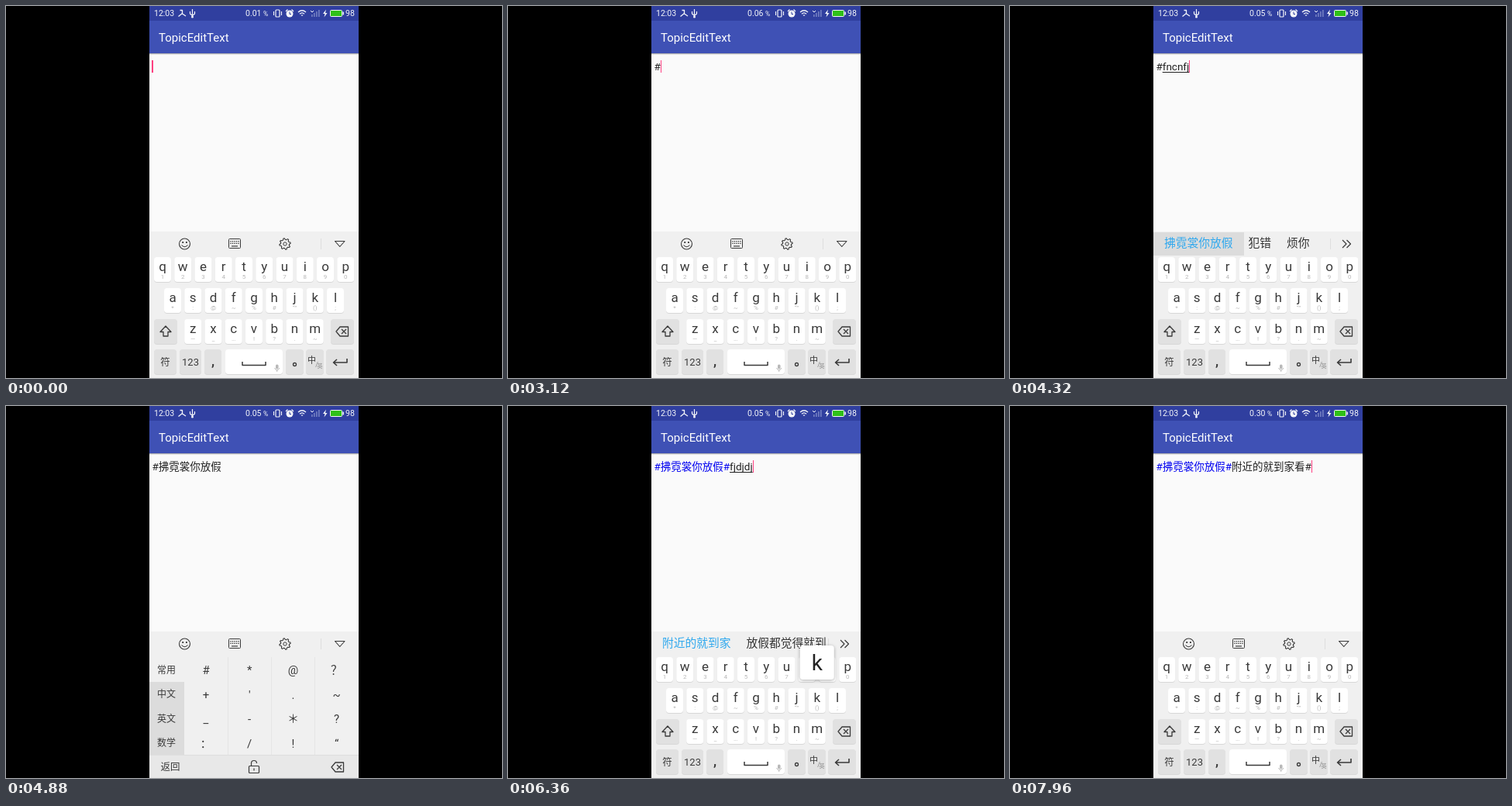
An HTML page that plays this animation: 640x480 px, repeating every 8 s.

```html
<!DOCTYPE html>
<html lang="zh-CN">
<head>
<meta charset="utf-8">
<title>TopicEditText</title>
<style>
html, body { margin: 0; width: 100%; height: 100%; overflow: hidden; background: #000; }
#stage { position: absolute; left: 0; top: 0; width: 640px; height: 480px; overflow: hidden; }
#stage, svg text { font-family: Roboto, "Noto Sans CJK SC", "Noto Sans CJK", sans-serif; }
svg { position: absolute; left: 0; top: 0; }
#line { position: absolute; left: 188.4px; top: 68px; height: 20px; font-size: 13.5px; line-height: 20px; color: #212121; white-space: pre; }
#topic { color: #0000f0; }
#comp { text-decoration: underline 1px; text-underline-offset: 2px; text-decoration-skip-ink: none; }
#caret { position: absolute; right: -1.2px; top: 2px; width: 1.3px; height: 16px; background: #ff4081; }
#cands { position: absolute; left: 185px; top: 292px; width: 228px; height: 30px; padding-left: 14px; box-sizing: border-box;
  display: flex; gap: 20px; overflow: hidden; font-size: 14.75px; line-height: 29px; color: #333; white-space: nowrap; }
#cands span { flex: none; }
#cands span:first-child { color: #2fa8ee; }
#cands.down span:first-child { background: #dcdcdc; box-shadow: 0 0 0 14px #dcdcdc; }
</style>
</head>
<body>
<div id="stage">
  <svg id="scene" width="640" height="480" viewBox="0 0 640 480"></svg>
  <div id="line"><span id="topic"></span><span id="plain"></span><span id="comp"></span><i id="caret"></i></div>
  <div id="cands"></div>
  <svg id="over" width="640" height="480" viewBox="0 0 640 480"></svg>
</div>
<script>
const $ = id => document.getElementById(id);
const INK = '#3a3a3a', BOARD = '#f0f0f0', FUNC = '#e1e1e1', PRESSED = '#cacaca', RULE = '#dedede', FAINT = '#b8b8b8';

const rect = (x, y, w, h, fill, r = 0, extra = '') =>
  `<rect x="${x}" y="${y}" width="${w}" height="${h}" rx="${r}" fill="${fill}" ${extra}/>`;
const label = (s, x, y, size, fill = INK, anchor = 'middle', extra = '') =>
  `<text x="${x}" y="${y}" font-size="${size}" fill="${fill}" text-anchor="${anchor}" ${extra}>${s}</text>`;
const stroke = (d, color = INK, w = 1.1, fill = 'none') =>
  `<path d="${d}" stroke="${color}" stroke-width="${w}" fill="${fill}" stroke-linejoin="round"/>`;
const key = (x, y, w, fill, id = '') =>
  rect(x, y + 1, w, 32, '#d8d8d8', 4) + rect(x, y, w, 32, fill, 4, id && `id="${id}"`);
const eraser = (x, y) =>
  stroke(`M${x - 8} ${y}l5 -6h10.5v12h-10.5z M${x - 1} ${y - 3}l6 6m0 -6l-6 6`, INK, 1.3);

function gear(cx, cy) {
  let d = '';
  for (let i = 0; i < 32; i++) {
    const a = (i - 1.5) * Math.PI / 16, r = i % 4 < 2 ? 7.2 : 5.5;
    d += `${i ? 'L' : 'M'}${(cx + r * Math.cos(a)).toFixed(2)} ${(cy + r * Math.sin(a)).toFixed(2)}`;
  }
  return stroke(d + 'z') + `<circle cx="${cx}" cy="${cy}" r="2.2" fill="none" stroke="${INK}"/>`;
}

function statusBar() {
  const W = '#f4f6fa';
  return rect(185, 0, 270, 19, '#303f9f') +
    label('12:03', 191, 13, 10.5, W, 'start') +
    stroke('M224.5 5.5h3v4.5M227.5 9.5l-5 4M227.5 10l4.5 3', W, 1.3) +
    stroke('M240.5 4v11M237.5 7v3l3 2.5 3 -2.5v-3', W, 1.2) +
    `<circle cx="240.5" cy="14" r="1.5" fill="${W}"/>` +
    label('0.01', 309, 13, 10.5, W, 'start', 'id="rate"') + label('%', 332, 13, 8.5, W, 'start') +
    rect(348, 5, 5, 9, 'none', 1, `stroke="${W}" stroke-width="1.2"`) +
    stroke('M345.5 7v5M355.5 7v5', W, 1.1) +
    `<circle cx="366" cy="10" r="4.5" fill="${W}"/>` +
    stroke('M366 7.5v3h2', '#303f9f', 1) + stroke('M361 7l2.5 -2.500M371 7l-2.500 -2.500', W, 1.3) +
    stroke('M377 8q5 -4.500 10 0M379 10.300q3 -2.800 6 0M381 12.400q1 -1 2 0', W, 1.3) +
    stroke('M393 6l2 2 2 -2', W, 1) +
    [0, 1, 2, 3].map(i => rect(394 + i * 3, 11 - i * 2, 1.7, 3 + i * 2, '#6f7cc0')).join('') +
    `<path d="M413 4.500l-4 5.500h2.500l-1 4.500 4 -5.500h-2.500z" fill="${W}"/>` +
    rect(418.5, 5.5, 15, 8, '#2fc018', 1, `stroke="${W}"`) + rect(434.5, 7.5, 1.5, 4, W) +
    label('98', 438, 13, 10.5, W, 'start');
}

function toolbar() {
  let dots = '';
  for (let r = 0; r < 2; r++)
    for (let c = 0; c < 5; c++) dots += rect(289.3 + c * 2.5, 303 + r * 2.7, 1.3, 1.3, INK);
  return `<circle cx="230.5" cy="307" r="7" fill="none" stroke="${INK}" stroke-width="1.1"/>` +
    rect(227.3, 304, 1.8, 2, INK) + rect(232, 304, 1.8, 2, INK) + stroke('M226.5 308.5q4 4.5 8 0') +
    rect(287.5, 300.5, 15, 12, 'none', 1, `stroke="${INK}"`) + dots + rect(291, 309.3, 8, 1.2, INK) +
    gear(360, 307) + rect(406, 300, 1, 14, RULE) + stroke('M424.5 303.5h12.5l-6.25 7z');
}

const ROWS = [
  { keys: 'qwertyuiop', hints: [...'1234567890'], x: 202, y: 324 },
  { keys: 'asdfghjkl', hints: ['*', ':', '@', '~', '%', '#', '“”', '()', ';'], x: 215, y: 364 },
  { keys: 'zxcvbnm', hints: ['—', '_', '…', '!', '?', '.', '~'], x: 241.2, y: 404 }
];
const STEP = 26.25, spot = {};

function letters() {
  let s = '';
  for (const { keys, hints, x, y } of ROWS)
    [...keys].forEach((k, i) => {
      const cx = x + i * STEP;
      spot[k] = [cx, y];
      s += key(cx - 11, y, 22, '#fff') + label(k, cx, y + 18, 17) + label(hints[i], cx, y + 27.5, 8, FAINT);
    });
  return s + key(191, 404, 30, FUNC) + key(419, 404, 30, FUNC) +
    stroke('M206 413l-7 7.5h4v5.5h6v-5.5h4z', INK, 1.3) + eraser(434, 420) +
    key(191, 443, 29, FUNC, 'symKey') + label('符', 205.5, 464, 12.5) +
    key(224, 443, 28, FUNC) + label('123', 238, 464, 13) +
    key(256, 443, 22, FUNC) + label(',', 267, 464, 17, INK, 'middle', 'font-weight="700"') +
    key(283, 443, 74, '#fff') + stroke('M305 459v4.5h30v-4.5', INK, 1.5) +
    rect(348, 462.5, 3.5, 6, FAINT, 1.7) + stroke('M346.5 467q3.2 6 6.5 0M349.7 470v2', FAINT, 1) +
    key(361, 443, 23, FUNC) + `<circle cx="372.5" cy="462.5" r="2" fill="none" stroke="${INK}" stroke-width="1.3"/>` +
    key(387, 443, 23, FUNC) + label('中', 394.5, 461, 11) + label('/', 401, 466, 9, '#888') + label('英', 405, 467, 7, '#888') +
    key(413, 443, 36, FUNC) + stroke('M440 455v5h-17M427 456l-4.5 4 4.5 4', INK, 1.6);
}

function symbols() {
  const cells = ['#*@？', "+'.~", '_-＊?', '：/!“'];
  let s = rect(185, 356, 45, 94, '#dcdcdc') + rect(185, 450, 270, 30, '#e8e8e8') +
    rect(185, 450, 270, 1, RULE) + rect(230, 324, 56, 32, '#dcdcdc', 0, 'id="hashCell"') +
    [286, 342, 398].map(x => rect(x, 324, 1, 126, '#e5e5e5')).join('');
  ['常用', '中文', '英文', '数学'].forEach((name, r) => {
    const y = 340 + r * 31.5;
    s += label(name, 207, y + 4.5, 12);
    [...cells[r]].forEach((c, i) => s += label(c, 258 + i * 56.2, y + 6, 15));
  });
  return s + label('返回', 212, 470, 12.5) +
    rect(313.5, 464.5, 13, 9, 'none', 1, `stroke="${INK}" stroke-width="1.2"`) +
    stroke('M316.5 464v-3a3.5 3.5 0 0 1 7 0M320 467.5v3', INK, 1.2) + eraser(428, 466);
}

$('scene').innerHTML = rect(185, 0, 270, 480, '#fafafa') + statusBar() +
  rect(185, 19, 270, 42, '#3f51b5') + rect(185, 61, 270, 1, '#b0b0b2') + rect(185, 62, 270, 1, '#e4e4e4') +
  label('TopicEditText', 197, 46, 15, '#fff', 'start') +
  rect(185, 291, 270, 189, BOARD) +
  `<g id="toolbar">${toolbar()}</g><g id="more">${rect(413, 300, 1, 14, RULE)}${stroke('M429 302l5 5-5 5M434.5 302l5 5-5 5', INK, 1.2)}</g>` +
  `<g id="letters">${letters()}</g><g id="symbols">${symbols()}</g>`;
$('over').innerHTML = `<g id="popup" style="filter:drop-shadow(0 1px 2px #0005)">${rect(-22, 0, 44, 44, '#fff', 4)}` +
  label('', 0, 31.5, 28, '#222', 'middle', 'id="big"') + '</g>';

// Timeline: each entry changes part of the state from its time on.
const LOOP = 8000, BLINK = 495, events = [];
const at = (time, change) => events.push([time, change]);

const HINTS = {
  f: '发 飞 放 分 番', fn: '妇女 烦你 付您 愤怒', fnc: '拂霓裳 犯错 给你吃 烦你',
  fncn: '拂霓裳你 犯错 烦你', fncnf: '拂霓裳你发 犯错 烦你', fncnfj: '拂霓裳你放假 犯错 烦你',
  fj: '附近 放假 房间 飞机', fjd: '附近的 放假的 房间的', fjdj: '附近的就 放假的就',
  fjdjd: '附近的就到 放假都觉得', fjdjdj: '附近的就到家 放假都觉得就到', fjdjdjk: '附近的就到家看 放假都觉得就到'
};

// A key's bubble outlasts its letter by a moment, unless the next key takes over.
function type(word, times, lastHold = 80) {
  times.forEach((t, i) => {
    const next = times[i + 1] ?? Infinity;
    const typed = t + (next < Infinity ? 80 : lastHold);
    at(t, { key: word[i] });
    at(typed, { comp: word.slice(0, i + 1), caret: typed });
    if (typed + 40 < next) at(typed + 40, { key: '' });
  });
}
function pick(press, commit, plain) {
  at(press, { down: 'cand' });
  at(commit, { down: '', comp: '', plain, caret: commit });
}
function hash(press, open, tap, texts) {
  at(press, { down: 'sym' });
  at(open, { down: '', panel: true });
  at(tap, { down: 'hash' });
  at(tap + 80, { ...texts, caret: tap + 80 });
  at(tap + 160, { down: '', panel: false });
}

at(0, { rate: '0.01', topic: '', plain: '', comp: '', key: '', down: '', panel: false, caret: -340 });
at(360, { rate: '0.06' });
hash(1400, 1560, 2960, { plain: '#' });
at(3400, { rate: '0.05' });
type('fncnfj', [3360, 3480, 3600, 3760, 3840, 3920]);
pick(4320, 4380, '#拂霓裳你放假');
hash(4720, 4880, 5560, { topic: '#拂霓裳你放假#', plain: '' });
type('fjdjdjk', [5760, 5840, 5960, 6040, 6160, 6240, 6360], 120);
at(6480, { rate: '0.30' });
pick(6680, 6760, '附近的就到家看');
hash(7160, 7320, 7800, { plain: '附近的就到家看#' });
events.sort((a, b) => a[0] - b[0]);

const show = (id, on) => $(id).style.display = on ? '' : 'none';
let applied = -1;

function render(s) {
  for (const id of ['topic', 'plain', 'comp']) $(id).textContent = s[id];
  $('rate').textContent = s.rate;
  const hints = s.comp ? HINTS[s.comp].split(' ') : [];
  $('cands').innerHTML = hints.map(h => `<span>${h}</span>`).join('');
  $('cands').className = s.down === 'cand' ? 'down' : '';
  show('toolbar', !s.comp);
  show('more', s.comp);
  show('letters', !s.panel);
  show('symbols', s.panel);
  show('hashCell', s.down === 'hash');
  $('symKey').setAttribute('fill', s.down === 'sym' ? PRESSED : FUNC);
  show('popup', s.key);
  if (s.key) {
    const [x, y] = spot[s.key];
    $('popup').setAttribute('transform', `translate(${x} ${y - 55})`);
    $('big').textContent = s.key;
  }
}

let state;
const start = performance.now();
function frame() {
  const t = (performance.now() - start) % LOOP;
  const past = events.filter(e => e[0] <= t);
  if (past.length !== applied) {
    applied = past.length;
    state = Object.assign({}, ...past.map(e => e[1]));
    render(state);
  }
  show('caret', Math.floor((t - state.caret) / BLINK) % 2 === 0);
  requestAnimationFrame(frame);
}
frame();
</script>
</body>
</html>
```
